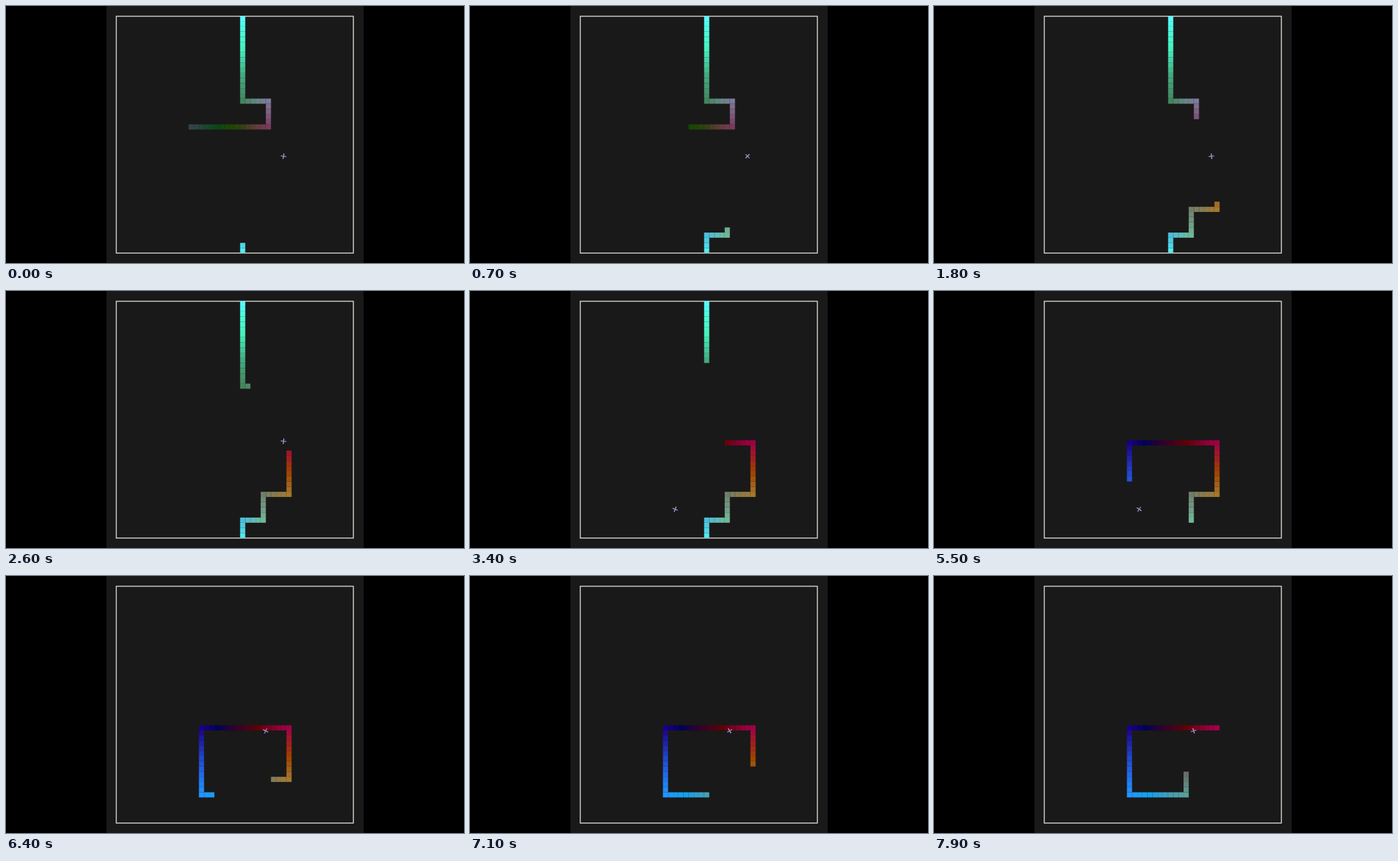
These frames come from a looping animation (692 px wide and 388 px high, 8 s). An HTML page with a canvas:

```html
<!DOCTYPE html>
<html lang="en">
<head>
<meta charset="utf-8">
<title>Snake</title>
<style>
  html, body { margin: 0; width: 100%; height: 100%; overflow: hidden; background: #000; }
  canvas { display: block; width: 692px; height: 388px; }
</style>
</head>
<body>
<canvas id="stage" width="692" height="388"></canvas>
<script>
const ctx = document.getElementById('stage').getContext('2d');

const LOOP = 8000, FRAME = 100;
const MOVE = 111.3, LEAD = 0.93;   // ms per move, and how far into a move the loop starts
const GRID = 46, CELL = 7.78, LEFT = 167, TOP = 15.3;
const LENGTH = 44;
const MEALS = [27, 58];            // moves on which the snake eats

// Start cell, then runs of [dx, dy, count]; rows wrap at the edge
const START = [14, 21];
const RUNS = [
  [1, 0, 15], [0, -1, 5], [-1, 0, 5], [0, -1, 20], [1, 0, 4], [0, -1, 5],
  [1, 0, 5], [0, -1, 10], [-1, 0, 17], [0, 1, 13], [1, 0, 11], [0, -1, 6]
];

const FOOD = [[419.3, 226.8], [310, 329.5], [392.3, 233.8]];
const ARMS = ['#c79a9c', '#8384cc', '#b5a0d6', '#9085cf'];

// Colour stops by position along the path
const STOPS = [
  [0, '#34444c'], [5, '#094818'], [8, '#204600'], [10, '#384015'], [12, '#593d33'],
  [15, '#7a3a5c'], [17, '#7e5479'], [20, '#7d7a9c'], [22, '#688688'], [25, '#44855c'],
  [30, '#44aa7f'], [35, '#46f0be'], [38, '#4cfad2'], [41, '#55fbff'], [43, '#50d6e6'],
  [45, '#4bbedc'], [49, '#72b798'], [54, '#707e6c'], [59, '#a5782d'], [63, '#a04600'],
  [66, '#a3201f'], [69, '#a00046'], [71, '#90003a'], [75, '#620005'], [80, '#2a0032'],
  [83, '#00005c'], [86, '#190082'], [90, '#2030b4'], [95, '#2369eb'], [99, '#2096ff'],
  [103, '#14a0eb'], [107, '#46a0b4'], [110, '#5a9e96'], [114, '#666e66']
].map(([at, hex]) => [at, [1, 3, 5].map(i => parseInt(hex.slice(i, i + 2), 16))]);

function colourAt(pos) {
  let i = STOPS.findIndex(stop => stop[0] >= pos);
  if (i < 0) i = STOPS.length - 1;
  if (i === 0) i = 1;
  const [a, from] = STOPS[i - 1], [b, to] = STOPS[i];
  const k = Math.min(1, (pos - a) / (b - a));
  return `rgb(${from.map((v, c) => Math.round(v + (to[c] - v) * k)).join(',')})`;
}

function buildPath() {
  let [x, y] = START;
  const cells = [[x, y]];
  for (const [dx, dy, count] of RUNS) {
    for (let i = 0; i < count; i++) {
      x += dx;
      y = (y + dy + GRID) % GRID;
      cells.push([x, y]);
    }
  }
  return cells.map(([col, row], i) => ({ col, row, colour: colourAt(i) }));
}
const path = buildPath();

function drawBoard() {
  ctx.fillStyle = '#000';
  ctx.fillRect(0, 0, 692, 388);
  ctx.fillStyle = '#191919';
  ctx.fillRect(151.7, 0, 388.8, 388);
  ctx.strokeStyle = '#d2d2ca';
  ctx.lineWidth = 1.5;
  ctx.strokeRect(166.6, 15.5, 358.2, 357.5);
}

function drawSnake(tail, head) {
  ctx.save();
  ctx.beginPath();
  ctx.rect(167, 15.5, 357, 356.9);
  ctx.clip();
  for (let i = tail; i <= head && i < path.length; i++) {
    const { col, row, colour } = path[i];
    ctx.fillStyle = colour;
    ctx.fillRect(LEFT + col * CELL, TOP + row * CELL, CELL, CELL);
  }
  ctx.restore();
}

function drawFood([x, y], degrees) {
  ctx.save();
  ctx.translate(x, y);
  ctx.rotate(degrees * Math.PI / 180);
  ctx.lineWidth = 1.4;
  for (const colour of ARMS) {
    ctx.strokeStyle = colour;
    ctx.beginPath();
    ctx.moveTo(0, 0);
    ctx.lineTo(0, -4.2);
    ctx.stroke();
    ctx.rotate(Math.PI / 2);
  }
  ctx.restore();
}

function draw(time) {
  const tick = Math.floor(time / FRAME);
  const moves = Math.floor(tick * FRAME / MOVE + LEAD);
  const eaten = MEALS.filter(m => moves >= m).length;
  drawBoard();
  drawSnake(moves - eaten, moves + LENGTH - 1);
  drawFood(FOOD[eaten], 10 - 20.85 * tick);
}

const began = performance.now();
function loop() {
  draw((performance.now() - began) % LOOP);
  requestAnimationFrame(loop);
}
loop();
</script>
</body>
</html>
```
